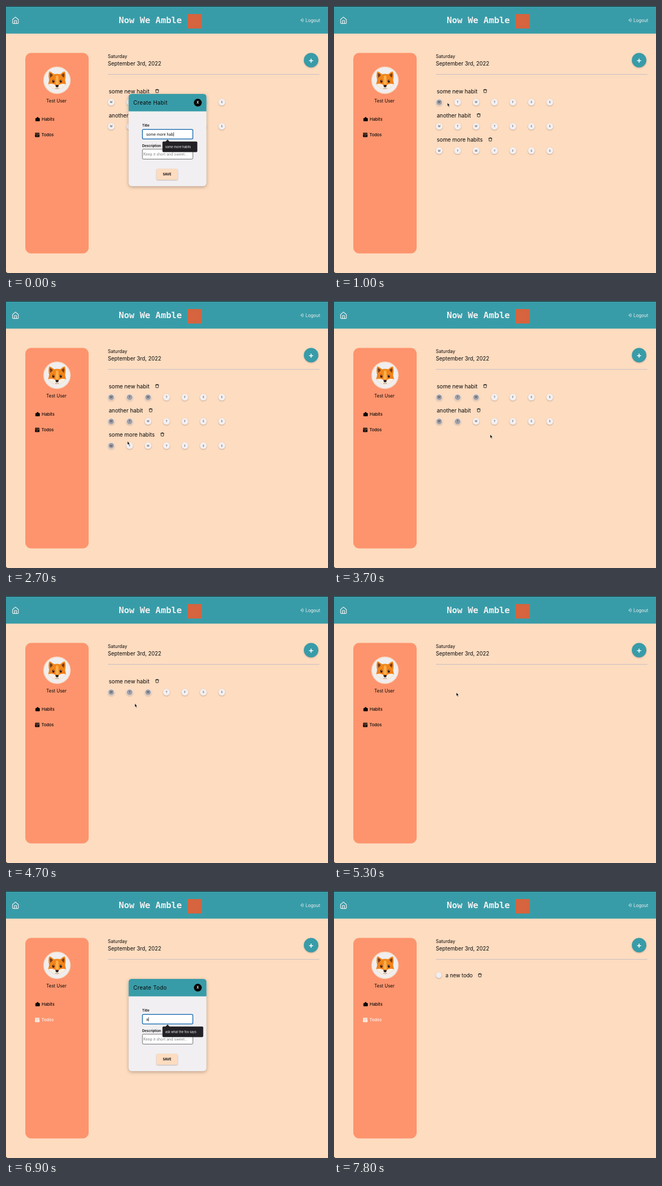
An HTML page that plays this animation: 600 px wide and 498 px high, repeating every 8000 ms.

```html
<!DOCTYPE html>
<html lang="en">
<head>
<meta charset="utf-8">
<title>Habit tracker</title>
<style>
  html, body { margin: 0; width: 100%; height: 100%; overflow: hidden; background: #fddcc0; }
  svg { display: block; width: 600px; height: 498px; }
  text { font-family: Inter, Roboto, sans-serif; fill: #080808; white-space: pre; }
  .brand { font: bold 16.3px "DejaVu Sans Mono", monospace; fill: #f1eff0; }
  .title { font-size: 10.2px; }
  .nav { font-size: 7.8px; font-weight: 500; }
  .day { font-size: 5px; text-anchor: middle; fill: #333; }
  .label { font-size: 6.3px; font-weight: 600; }
  .field { font-size: 6.9px; }
  .tip { font-size: 5.7px; fill: #f4f2f4; }
  .light { fill: #f1eff0; }
  .line { fill: none; stroke-linecap: round; stroke-linejoin: round; }
  .raised { filter: drop-shadow(0 1px 1px rgba(60, 40, 30, .3)); }
  #modal { filter: drop-shadow(0 2px 3px rgba(60, 40, 30, .32)); }
</style>
</head>
<body>
<svg viewBox="0 0 600 498">
  <defs>
    <g id="trash" class="line" stroke="#111" stroke-width=".85">
      <path d="M-3.1-1.9H3.1M-1.3-2V-3.1H1.3V-2M-2.4-1.8V2.5Q-2.4 3.2-1.7 3.2H1.7Q2.4 3.2 2.4 2.5V-1.8"/>
    </g>
    <linearGradient id="fur" x2="0" y2="1">
      <stop offset="0" stop-color="#f08a1c"/><stop offset="1" stop-color="#f47a18"/>
    </linearGradient>
  </defs>

  <rect width="600" height="498" fill="#fddcc0"/>
  <rect width="600" height="51.5" fill="#389ca8"/>
  <rect width="600" height="1" fill="#1d2022"/>
  <path d="M0 494Q0 498 4 498H0Z" fill="#222"/>

  <path class="line" stroke="#f4f2f2" stroke-width="1.2"
    d="M12.3 25.2 17.6 20.6 23 25.2V31.4Q23 32.6 21.8 32.6H13.5Q12.3 32.6 12.3 31.4ZM15.8 32.4V27H19.5V32.4"/>
  <text class="brand" x="210" y="31.5">Now We Amble</text>
  <rect x="338" y="15" width="27" height="27" fill="#d5643f"/>
  <path class="line" stroke="#f1eff0" stroke-width=".7"
    d="M551 24H553Q554 24 554 25V28Q554 29 553 29H551M549.3 26.5H552.3M550.8 25 549.3 26.5 550.8 28"/>
  <text class="light" x="558" y="29.5" font-size="8.3">Logout</text>

  <rect x="36" y="87.5" width="118" height="374" rx="11" fill="#fd946d"/>
  <circle cx="95" cy="138.5" r="24.6" fill="#f0eeef" stroke="#f8dcc6" stroke-width="1.6"/>
  <g id="fox">
    <path fill="url(#fur)" d="M80.5 122.3Q83 121.4 89.5 127.3Q95 125.8 101 127.3Q107 121.4 109.7 122.3Q112.2 129 110 138L111.8 146Q104 155.8 95.2 156.3Q86 155.8 78.6 146L80.4 138Q78.3 129 80.5 122.3Z"/>
    <path fill="#753c20" d="M81.9 125Q85 126 87.3 129L82.7 134Q81 129 81.9 125ZM108.4 125Q105.4 126 103.2 129L107.7 134Q109.4 129 108.4 125Z"/>
    <path fill="#f7efe4" d="M78.6 146Q84 143.8 90.5 146.2L95.2 150 100 146.2Q106 143.8 111.8 146Q104.4 155.8 95.2 156.3Q86 155.8 78.6 146Z"/>
    <path fill="#fbb04c" d="M93 131Q95.2 128 97.5 131L98.4 145Q95.2 149 92.1 145Z"/>
    <ellipse cx="88.3" cy="140.3" rx="2" ry="2.8" fill="#291b18"/>
    <ellipse cx="102.2" cy="140.3" rx="2" ry="2.8" fill="#291b18"/>
    <circle cx="88.8" cy="139" r=".7" fill="#fff"/><circle cx="102.7" cy="139" r=".7" fill="#fff"/>
    <path fill="#241d20" d="M92 148.2Q95.2 146.5 98.4 148.2Q97.5 151.6 95.2 151.8Q92.8 151.6 92 148.2Z"/>
    <path class="line" stroke="#6b4a3c" stroke-width=".7" d="M92 153.4Q95.2 155 98.4 153.4"/>
  </g>
  <text x="75" y="180" font-size="8.4">Test User</text>
  <path d="M55.8 209H57.4V207.8Q57.4 207.3 57.9 207.3H60Q60.5 207.3 60.5 207.8V209H62Q63 209 63 210V214Q63 215 62 215H55.8Q54.8 215 54.8 214V210Q54.8 209 55.8 209Z" fill="#080808"/>
  <text class="nav" x="66.6" y="214.4">Habits</text>
  <g id="todos" fill="#080808">
    <path d="M55 236.6H61.4Q62.4 236.6 62.4 237.6V238.5H54V237.6Q54 236.6 55 236.6ZM54 239.3H62.4V243.4Q62.4 244.4 61.4 244.4H55Q54 244.4 54 243.4Z"/>
    <path class="line" d="M56.6 241.6 57.8 242.7 59.9 240.5" stroke="#fd946d" stroke-width=".8"/>
    <text class="nav" x="66" y="243.4" style="fill:inherit">Todos</text>
  </g>

  <text x="189.7" y="97" font-size="8.6">Saturday</text>
  <text x="189.7" y="111.4" font-size="9.9">September 3rd, 2022</text>
  <path d="M190 127.5H584" stroke="#c6bec1"/>
  <circle id="add" class="raised" cx="568.5" cy="101" r="13.5"/>
  <path d="M564.7 102H572.3M568.5 98.2V105.8" stroke="#fff" stroke-width="1.7"/>

  <g id="rows"></g>
  <g id="todo">
    <circle class="raised" cx="195.3" cy="157" r="5.4" fill="#f0eef0"/>
    <text x="207.8" y="160.6" font-size="9.7">a new todo</text>
    <use href="#trash" x="271.8" y="157"/>
  </g>

  <g id="modal">
    <rect x="228.5" y="164" width="145" height="172" rx="6" fill="#f1eff1"/>
    <path d="M228.5 196.5V170Q228.5 164 234.5 164H367.5Q373.5 164 373.5 170V196.5Z" fill="#389ca8"/>
    <text id="heading" class="title" x="237.2" y="184.4" letter-spacing=".3"></text>
    <circle cx="357.4" cy="180.3" r="7.3" fill="#050505"/>
    <text class="light" x="357.4" y="182.4" font-size="5.6" font-weight="700" text-anchor="middle" style="fill:#fff">X</text>
    <text class="label" x="253.8" y="225.4">Title</text>
    <rect id="box" x="254.2" y="230.2" width="94" height="17.8" rx="2" fill="#fff"/>
    <text id="typed" class="field" x="261.2" y="241.7"></text>
    <rect id="caret" y="235.4" width=".7" height="7.8" fill="#111"/>
    <text class="label" x="253.8" y="262.6">Description</text>
    <rect x="254.2" y="267" width="94" height="18.6" rx="2" fill="#fff" stroke="#58585c" stroke-width=".9"/>
    <text class="field" x="256" y="278.7" style="fill:#818186">Keep it short and sweet...</text>
    <rect class="raised" x="280.5" y="303.7" width="39.4" height="20.2" rx="2" fill="#fddcc0"/>
    <text class="label" x="300.2" y="316" text-anchor="middle" style="font-size:5.9px;font-weight:700">SAVE</text>
    <g id="hint">
      <path d="M297 253.2 301 249 305 253.2Z" fill="#232125"/>
      <rect id="hintBox" x="291.5" y="252.8" height="19.6" rx="2" fill="#232125"/>
      <text id="hintText" class="tip" x="296.7" y="264.8"></text>
    </g>
  </g>

  <g id="cursor" stroke="#fff" stroke-width=".5" stroke-linejoin="round">
    <path id="arrow" d="M0 0V6.6L1.5 5.3 2.6 7.9 3.8 7.4 2.7 4.9H4.7Z" fill="#080808"/>
    <path id="hand" d="M-.6 0Q0-.7.7 0V2.6Q3.6 2.5 4.3 3.6V5.6L3.4 8H-.3L-2.5 4.9Q-2.2 4-.6 5Z" fill="#111" stroke-width=".8"/>
  </g>
</svg>
<script>
const LOOP = 8000, STEP = 100;
const $ = id => document.getElementById(id);
const show = (el, on) => { el.style.display = on ? "" : "none"; };
const dayX = i => 196 + 34.35 * i;

// Each habit: title, trash position, time added, time removed, tick times for M, T, W.
const habits = [
  { title: "some new habit", trash: 281.6, from: 0, to: 5100, ticks: [900, 1200, 1400] },
  { title: "another habit", trash: 269.6, from: 0, to: 4300, ticks: [1600, 2200] },
  { title: "some more habits", trash: 291.3, from: 600, to: 3700, ticks: [1900, 2900] }
];

// Pointer stops: time, x, y.
const path = [
  [600, 262, 218], [800, 197, 181], [900, 197, 181], [1000, 211.3, 180.5],
  [1200, 230, 180], [1400, 264, 180], [1600, 197, 225], [1800, 197, 270],
  [1900, 197, 270], [2200, 230, 225], [2300, 230, 226], [2700, 226.3, 261.5],
  [2900, 229, 271], [3000, 230, 272], [3200, 250, 281], [3500, 291, 249],
  [3700, 291, 249], [4100, 269.5, 204], [4400, 269.5, 204], [4700, 240, 200.5],
  [5000, 281.5, 159], [5200, 281.5, 159], [5500, 75, 240], [5600, 75, 240],
  [5900, 568, 101], [6000, 572, 102], [6200, 572, 102], [6500, 300, 239], [6700, 300, 240]
];

// Dialog steps: time, heading, typed text, hint; an empty heading closes it.
const dialog = [
  [0, "Create Habit", "some more hab", "some more habits"],
  [100, "Create Habit", "some more habi", "some more habits"],
  [200, "Create Habit", "some more habit", "some more habits"],
  [300, "Create Habit", "some more habits", ""],
  [600, "", "", ""],
  [6300, "Create Todo", "", ""],
  [6900, "Create Todo", "a", "ask what the fox says"],
  [7000, "Create Todo", "a n", ""],
  [7100, "Create Todo", "a ne", ""],
  [7200, "Create Todo", "a new", ""],
  [7300, "Create Todo", "a new t", ""],
  [7400, "Create Todo", "a new to", ""],
  [7500, "Create Todo", "a new todo", ""],
  [7600, "", "", ""]
];

habits.forEach((h, r) => {
  h.y = 179.5 + 45.15 * r;
  const days = [..."MTWTFSS"].map((d, i) => `
    <circle class="raised" cx="${dayX(i)}" cy="${h.y}" r="6.2" fill="#f3f0f2"/>
    <circle class="tick" cx="${dayX(i)}" cy="${h.y}" r="5.3" fill="#a3a0a6"/>
    <text class="day" x="${dayX(i)}" y="${h.y + 1.8}">${d}</text>`).join("");
  $("rows").insertAdjacentHTML("beforeend", `<g>
    <text class="title" x="191.4" y="${h.y - 16.5}">${h.title}</text>
    <use href="#trash" x="${h.trash}" y="${h.y - 21}"/>${days}</g>`);
  h.el = $("rows").lastElementChild;
  h.marks = h.el.querySelectorAll(".tick");
});

const near = (p, x, y, r) => Math.hypot(p.x - x, p.y - y) < r;

function pointerAt(t) {
  const i = path.findIndex(k => k[0] > t);
  if (i < 1) return null;
  const [t0, x0, y0] = path[i - 1], [t1, x1, y1] = path[i];
  const u = (t - t0) / (t1 - t0), e = u * u * (3 - 2 * u);
  return { x: x0 + (x1 - x0) * e, y: y0 + (y1 - y0) * e };
}

function drawDialog(t) {
  const [, heading, typed, hint] = dialog.findLast(s => s[0] <= t);
  show($("modal"), heading);
  if (!heading) return;
  const focused = t < 600 || t >= 6600;
  $("heading").textContent = heading;
  $("typed").textContent = typed;
  $("box").setAttribute("stroke", focused ? "#2272b5" : "#58585c");
  $("box").setAttribute("stroke-width", focused ? 1.5 : .9);
  show($("caret"), focused);
  $("caret").setAttribute("x", 261.6 + $("typed").getComputedTextLength());
  show($("hint"), hint);
  $("hintText").textContent = hint;
  $("hintBox").setAttribute("width", heading === "Create Todo" ? 76 : 65);
}

function drawPointer(t) {
  const p = pointerAt(t);
  show($("cursor"), p);
  const onAdd = p && near(p, 568.5, 101, 13.5);
  $("add").setAttribute("fill", onAdd ? "#29324f" : "#389ca8");
  if (!p) return;
  const onHabit = habits.some(h => t >= h.from && t < h.to &&
    (near(p, h.trash, h.y - 21, 4) || h.ticks.some((_, i) => near(p, dayX(i), h.y, 6.2))));
  const hand = onAdd || onHabit || near(p, 75, 240, 10);
  show($("hand"), hand);
  show($("arrow"), !hand);
  $("cursor").setAttribute("transform", `translate(${p.x} ${p.y})`);
}

function draw(t) {
  for (const h of habits) {
    show(h.el, t >= h.from && t < h.to);
    h.marks.forEach((m, i) => show(m, t >= h.ticks[i]));
  }
  $("todos").setAttribute("fill", t >= 5500 ? "#fbf5f2" : "#080808");
  show($("todo"), t >= 7600);
  drawDialog(t);
  drawPointer(t);
}

function tick() {
  draw(Math.floor(performance.now() % LOOP / STEP) * STEP);
  requestAnimationFrame(tick);
}
tick();
</script>
</body>
</html>
```
